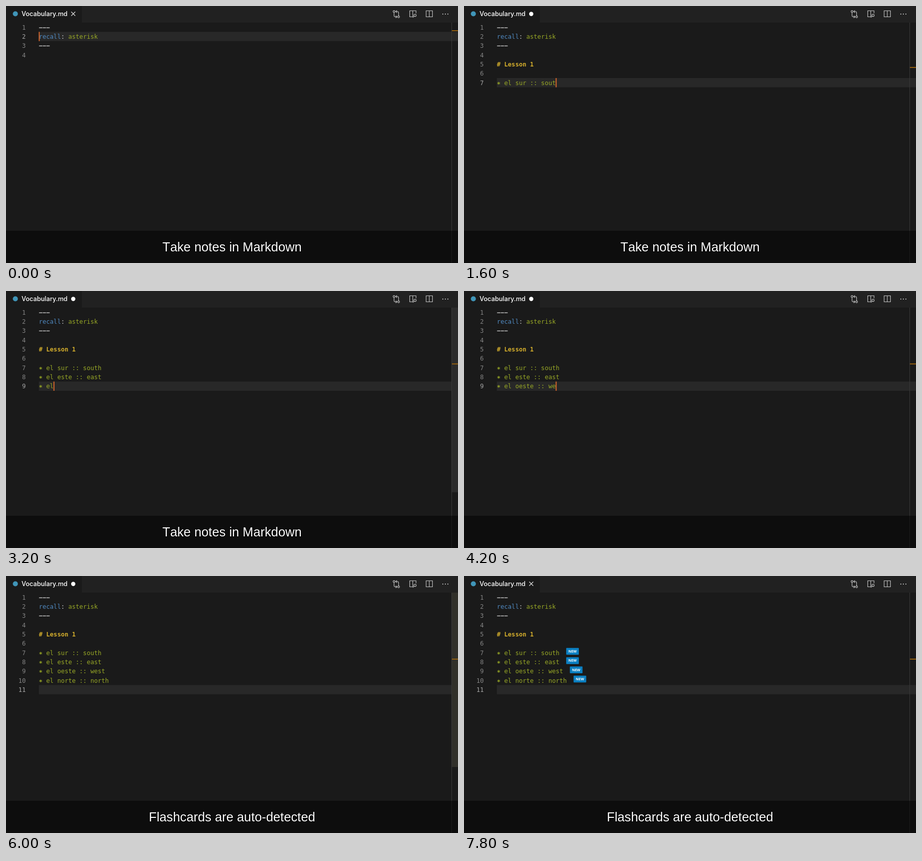
These frames come from a looping animation (894x510 px, 8 s). An HTML page:

```html
<!DOCTYPE html>
<html lang="en">
<head>
<meta charset="utf-8">
<title>Vocabulary notes</title>
<style>
  html, body { margin: 0; width: 100%; height: 100%; overflow: hidden; background: #1a1a1a; }
  svg { display: block; width: 894px; height: 510px; }
  text { white-space: pre; }
  #editor text { font: 12.1px "DejaVu Sans Mono", monospace; }
  #editor .num { fill: #848484; text-anchor: end; }
  #editor .active { fill: #a6a6a6; }
  #editor .rule { fill: #c8c8c8; font-weight: bold; }
  #editor .key { fill: #5089c0; }
  #editor .item { fill: #98a826; }
  #editor .head { fill: #d4ae2c; font-weight: bold; }
  #editor .bullet { font-weight: bold; }
  #editor .new { font: bold 7px "Open Sans", sans-serif; fill: #fff; text-anchor: middle; }
  .tab { font: 500 12.65px Inter, sans-serif; fill: #fff; }
  .icons { fill: none; stroke: #c5c5c5; stroke-width: 1.1; }
  #caption {
    font: 25.3px "Liberation Sans", Arial, sans-serif; font-kerning: none;
    fill: #fff; text-anchor: middle;
    stroke: #000; stroke-width: 2px; paint-order: stroke;
  }
</style>
</head>
<body>
<svg viewBox="0 0 894 510">
  <rect width="894" height="510" fill="#1a1a1a"/>
  <rect x="150" width="744" height="33" fill="#212121"/>
  <circle cx="18.5" cy="15.5" r="5" fill="#4095b8"/>
  <text class="tab" x="30.7" y="20">Vocabulary.md</text>
  <path id="close" d="M129 11.5l8 8m0-8l-8 8" stroke="#dcdcdc" stroke-width="1.2"/>
  <circle id="dirty" cx="133" cy="15.7" r="4.2" fill="#fff"/>
  <g class="icons">
    <circle cx="767.5" cy="11" r="1.9"/>
    <circle cx="776.5" cy="21.5" r="1.9"/>
    <path d="M767.5 13v6q0 2.5 2.5 2.5h3m-2.2-2.4l2.4 2.4l-2.4 2.4M776.5 19.5v-6q0-2.5-2.5-2.5h-3m2.2-2.4l-2.4 2.4l2.4 2.4"/>
    <path d="M804.5 21.5h-6v-12h12.5v5M804.5 9.5v12"/>
    <circle cx="809" cy="18.5" r="2.3"/>
    <path d="M807.3 20.2l-2.6 2.6"/>
    <path d="M831 9.5h12.5v12h-12.5zM837.2 9.5v12"/>
  </g>
  <g fill="#c5c5c5">
    <circle cx="864" cy="16" r="1.1"/><circle cx="869" cy="16" r="1.1"/><circle cx="874" cy="16" r="1.1"/>
  </g>
  <g id="editor"></g>
  <rect y="446" width="894" height="64" opacity=".5"/>
  <text id="caption" x="447" y="487"></text>
</svg>
<script>
const LOOP = 8000, STEP = 200;
const TOP = 33, ROW = 55 / 3, VIEW = 477, LEFT = 65, CHAR = 7.285;
const SAVED = 6600, BADGES = 6800;

// Enter inside the list also inserts the next bullet.
const KEYS = ('\n# Lesson 1\n\n∗ el sur :: south\n∗ el este :: east' +
  '\n∗ el oeste :: west\n∗ el norte :: north\n').match(/\n∗ |[^]/g);
// [time, keys pressed]
const TYPING = [[0, 0], [300, 0], [1600, 27], [2600, 44], [2900, 44],
  [4200, 59], [4800, 64], [5800, 80], [LOOP, 80]];

const $ = id => document.getElementById(id);
const rowTop = row => TOP + (row - 1) * ROW;

function typedLines(t) {
  const i = TYPING.findIndex(([time]) => time > t);
  const [t0, k0] = TYPING[i - 1], [t1, k1] = TYPING[i];
  const count = Math.floor(k0 + (k1 - k0) * (t - t0) / (t1 - t0) + 1e-6);
  return KEYS.slice(0, count).join('').split('\n');
}

function sliderOpacity(t, rows) {
  if (rows === 4) return 0;
  let age = STEP;
  while (age < 800 && typedLines(t - age).length + 3 === rows) age += STEP;
  return age < 600 ? 1 : age < 800 ? 0.5 : 0;
}

const rect = (x, y, w, h, fill, extra = '') =>
  `<rect x="${x}" y="${y}" width="${w}" height="${h}" fill="${fill}" ${extra}/>`;
const text = (cls, x, row, str) =>
  `<text class="${cls}" x="${x}" y="${rowTop(row) + 13.5}">${str}</text>`;

function badge(row, length) {
  const x = LEFT + length * CHAR + 13.3, y = rowTop(row) - 0.2;
  return rect(x, y, 25, 13.5, '#0b7fc1', 'rx="1"') +
    `<text class="new" x="${x + 12.5}" y="${y + 9.3}">NEW</text>`;
}

function draw(t) {
  const lines = typedLines(t), rows = lines.length + 3;
  const active = t < STEP ? 2 : rows;
  const column = active === 2 ? 0 : lines[lines.length - 1].length;
  const scale = VIEW / (VIEW + (rows - 1) * ROW);
  const cursorOn = t < 6000 || Math.floor((t - 5800) / 500) % 2 === 1;

  let out = rect(LEFT, rowTop(active), 894 - LEFT, ROW, '#282828');
  out += rect(881, TOP, 1, VIEW, '#383838');
  out += rect(882, TOP, 12, VIEW * scale + 1.5, rows === 11 ? '#31302a' : '#2b2b2b',
    `opacity="${sliderOpacity(t, rows)}"`);
  out += rect(882, TOP + (active - 1) * ROW * scale - 1.4, 12, 1.8, '#a0660f');

  for (let row = 1; row <= rows; row++) {
    out += text(row === active ? 'num active' : 'num', 39, row, row);
  }
  out += text('rule', LEFT, 1, '−−−') + text('rule', LEFT, 3, '−−−');
  out += text('key', LEFT, 2, 'recall<tspan fill="#c8c8c8">:</tspan>');
  out += text('item', LEFT + 8 * CHAR, 2, 'asterisk');
  lines.forEach((line, i) => {
    const markup = line.replace('∗', '<tspan class="bullet">∗</tspan>');
    out += text(line[0] === '#' ? 'head' : 'item', LEFT, i + 4, markup);
    if (t >= BADGES && line[0] === '∗') out += badge(i + 4, line.length);
  });
  if (cursorOn) out += rect(LEFT + column * CHAR - 0.3, rowTop(active), 2, ROW, '#d2642a');

  $('editor').innerHTML = out;
  const dirty = rows > 4 && t < SAVED;
  $('dirty').style.display = dirty ? '' : 'none';
  $('close').style.display = dirty ? 'none' : '';
  $('caption').textContent = t < 4000 ? 'Take notes in Markdown'
    : t < 5400 ? '' : 'Flashcards are auto-detected';
}

const start = performance.now();
let shown = -1;
function tick() {
  const t = Math.floor((performance.now() - start) % LOOP / STEP) * STEP;
  if (t !== shown) draw(shown = t);
  requestAnimationFrame(tick);
}
tick();
</script>
</body>
</html>
```
